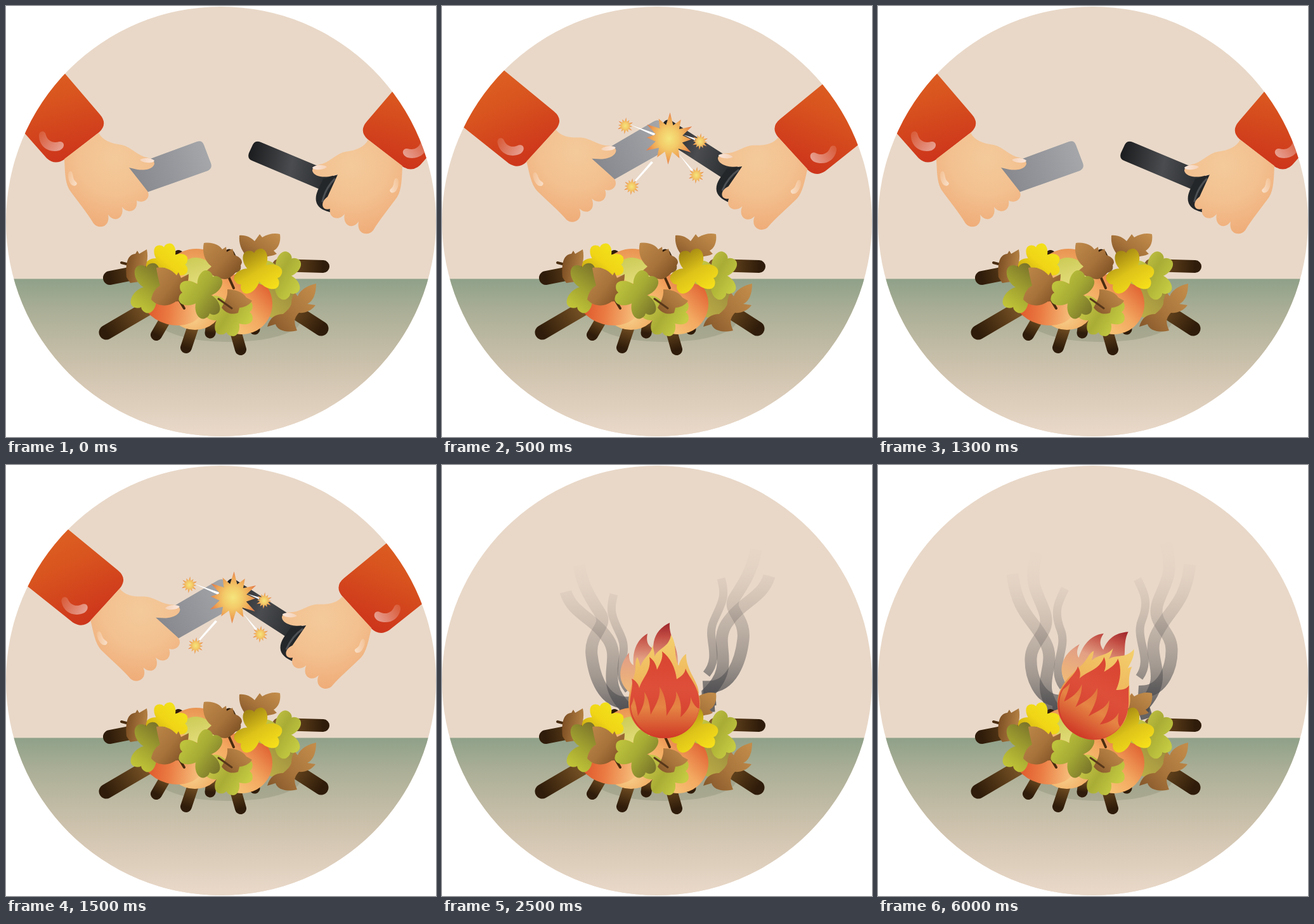
An HTML page that plays this animation: 678 by 680 pixels, repeating every 8000 ms.

```html
<!DOCTYPE html>
<html lang="en">
<head>
<meta charset="utf-8">
<title>Campfire</title>
<style>
  html, body { margin: 0; width: 100%; height: 100%; overflow: hidden; background: #fff; }
  svg { display: block; width: 100%; height: 100%; }
</style>
</head>
<body>
<svg id="stage" viewBox="0 0 678 680" xmlns="http://www.w3.org/2000/svg"></svg>
<script>
const defs = [];

// Linear gradient from (x1,y1) to (x2,y2); stops are [offset, colour, opacity].
function linear(id, [x1, y1, x2, y2], stops, fixed) {
  defs.push(`<linearGradient id="${id}" x1="${x1}" y1="${y1}" x2="${x2}" y2="${y2}"` +
    `${fixed ? ' gradientUnits="userSpaceOnUse"' : ''}>${stopList(stops)}</linearGradient>`);
}
function radial(id, [cx, cy, r], stops, fixed) {
  defs.push(`<radialGradient id="${id}" cx="${cx}" cy="${cy}" r="${r}"` +
    `${fixed ? ' gradientUnits="userSpaceOnUse"' : ''}>${stopList(stops)}</radialGradient>`);
}
function stopList(stops) {
  return stops.map(([o, c, a = 1]) => `<stop offset="${o}" stop-color="${c}" stop-opacity="${a}"/>`).join('');
}
const shape = (d, id, extra = '') => `<path d="${d}" fill="url(#${id})" ${extra}/>`;
const line = (d, color, width) =>
  `<path d="${d}" fill="none" stroke="${color}" stroke-width="${width}" stroke-linecap="round"/>`;
const blob = (cx, cy, rx, ry, id, turn = 0) =>
  `<ellipse cx="${cx}" cy="${cy}" rx="${rx}" ry="${ry}" fill="url(#${id})" transform="rotate(${turn} ${cx} ${cy})"/>`;

linear('ground', [0, 430, 0, 672], [[0, '#8fa189'], [.22, '#acaf97'], [.6, '#cfc3ae'], [1, '#e9d8c8']], true);
linear('sleeve', [.45, .2, .6, 1], [[0, '#e16a25'], [.5, '#d9551f'], [1, '#cd351b']]);
radial('skin', [172, 240, 112], [[0, '#f4ca9b'], [.5, '#f3c190'], [1, '#efac78']], true);
linear('shine', [0, 0, 1, .7], [[0, '#fff', .1], [1, '#fff', .5]]);
linear('nail', [0, 0, 1, 0], [[0, '#f4d2b8'], [1, '#fae6db']]);
linear('steel', [0, .6, 1, .4], [[0, '#85878c'], [.5, '#94969b'], [1, '#a5a7aa']]);
linear('iron', [0, .5, 1, .4], [[0, '#25282a'], [.5, '#4a4c4f'], [1, '#1c1d1f']]);
radial('spark', [.5, .5, .5], [[0, '#f5e57c'], [.4, '#f3cb69'], [.75, '#efa656'], [1, '#e5804b']]);
radial('peach', [.45, .7, .75], [[0, '#f8d28e'], [.6, '#f1ae65'], [1, '#e88f4e']]);
linear('ember', [0, .5, 1, .4], [[0, '#dc4d25'], [.45, '#ea7a42'], [1, '#f8c984']]);
linear('amber', [.1, .9, .9, .1], [[0, '#f9ce7d'], [.5, '#f3a860'], [1, '#de5a2d']]);
linear('lime', [0, 0, 1, 1], [[0, '#c7c850'], [1, '#ebe184']]);
linear('straw', [0, 1, 1, 0], [[0, '#c4b74a'], [1, '#95853b']]);
linear('yellow', [20, -30, -28, 26], [[0, '#f3e11a'], [.45, '#f0d516'], [1, '#c3a213']], true);
linear('gold', [20, 30, -20, -34], [[0, '#f7e01a'], [.5, '#ddc319'], [1, '#9f8313']], true);
linear('olive', [-22, 34, 22, -26], [[0, '#c3c738'], [.5, '#a1a230'], [1, '#7d762b']], true);
linear('green', [-30, -18, 30, 22], [[0, '#bdc33c'], [.45, '#a5aa34'], [1, '#79752a']], true);
linear('fresh', [30, 20, -32, -18], [[0, '#c6cc42'], [.5, '#a9ac35'], [1, '#cacb4a']], true);
linear('brown', [0, .9, 1, .1], [[0, '#85572a'], [.45, '#a8743b'], [1, '#c28c4a']]);
linear('bark', [0, .1, 1, .9], [[0, '#bd8748'], [.5, '#a8733b'], [1, '#774b20']]);
linear('umber', [0, .4, 1, .6], [[0, '#7b4d22'], [1, '#b98546']]);
linear('smoke', [0, 395, 0, 150], [[0, '#46464b', .8], [.25, '#5a5858', .5],
  [.5, '#736c68', .33], [.68, '#877c75', .19], [.85, '#9d9087', .07], [1, '#b4a59a', .02]], true);
linear('backFire', [0, 250, 0, 352], [[0, '#9f272c'], [.2, '#c24c43'], [.55, '#e3a084'], [1, '#eeb779']], true);
linear('outerFire', [0, 268, 0, 431], [[0, '#f4d06d'], [.45, '#efb75c'], [1, '#d8572d']], true);
linear('midFire', [0, 290, 0, 431], [[0, '#d8432f'], [.45, '#de4f3a'], [1, '#d03a28']], true);
linear('innerFire', [0, 350, 0, 431], [[0, '#e0733c'], [.4, '#e58544'], [1, '#cf3826']], true);

// Hands are drawn for the left side; the right one is mirrored.
function hand(tool, knuckle) {
  return shape('M0,-2 L148,171 Q161,186 147,199 L92,242 Q77,252 64,240 L-40,122Z', 'sleeve') +
    shape('M52,206C51,196 62,195 63,204C66,213 74,217 84,214C93,213 94,224 84,228C67,232 53,222 52,206Z', 'shine') +
    tool +
    shape('M91,242L146,200C152,212 166,217 182,219C196,222 204,233 218,238C228,240 234,243 234,249' +
      `C232,257 220,260 207,258L194,255${knuckle}C209,323 193,330 183,317C187,335 171,343 161,329` +
      'C165,349 146,353 138,343C128,326 112,307 100,290C93,278 93,262 92,241Z', 'skin') +
    shape('M211,243C217,238 230,240 234,244C233,248 218,249 211,243Z', 'nail') +
    shape('M99,262C104,258 105,264 106,270C107,276 111,277 112,280C111,285 104,285 101,279C98,273 97,266 99,262Z', 'shine');
}
const leftHand = hand(
  shape('M190,255L301,214Q309,211 312,219L323,248Q326,256 318,260L205,300Z', 'steel'),
  'L223,292C229,302 218,313 206,307');
const rightHand = hand(
  shape('M205,250L315,204Q324,200 328,208L334,221Q337,230 329,233L218,280L198,262Z', 'iron') +
  '<path d="M194,255L217,262C224,277 230,286 228,297C226,307 217,312 203,315L198,290Z" fill="#242729"/>' +
  line('M199,262Q213,276 218,297', '#4d5053', 3),
  'L210,290C222,298 220,313 206,309');

function star(cx, cy, r, turn) {
  const pts = [];
  for (let i = 0; i < 24; i++) {
    const a = i * Math.PI / 12 + turn;
    const d = r * (i % 2 ? .53 : i % 4 ? .86 : 1);
    pts.push((cx + d * Math.sin(a)).toFixed(1) + ',' + (cy - d * Math.cos(a)).toFixed(1));
  }
  return `<polygon points="${pts.join(' ')}" fill="url(#spark)"/>`;
}
const sparks = '<path d="M296,187L336,201L335,205ZM330,245L333,247L306,277L304,275ZM373,233L396,259L393,260ZM380,203L400,209L399,212Z" fill="#fff"/>' +
  star(358, 209, 41, .04) +
  [[289, 189], [407, 214], [401, 267], [299, 285]].map(([x, y]) => star(x, y, 13, .1)).join('');

// Logs fade from a dark tip to a lighter brown.
const logs = [
  [164, 429, 235, 415, 22], [158, 515, 228, 474, 23], [500, 411, 430, 409, 20],
  [497, 509, 435, 469, 23], [237, 519, 255, 488, 18], [322, 516, 325, 494, 17],
  [392, 510, 386, 490, 17], [284, 539, 297, 500, 18], [370, 542, 357, 496, 18],
  [352, 392, 362, 412, 17], [272, 393, 268, 410, 16]
].map(([x1, y1, x2, y2, w], i) => {
  linear('log' + i, [x1, y1, x2, y2], [[0, '#2f1c0a'], [.5, '#573a18'], [1, '#80592a']], true);
  return line(`M${x1},${y1}L${x2},${y2}`, `url(#log${i})`, w);
}).join('');

function clover(x, y, turn, spread, size, id) {
  const lobe = 'M0,3C-24,-6 -25,-38 -10,-38Q-3,-38 0,-33Q3,-38 10,-38C25,-38 24,-6 0,3Z';
  return `<g transform="translate(${x} ${y}) scale(${size})">` +
    [0, -spread, spread].map(a => {
      const key = id + Math.round(x) + (a + 200);
      // Each lobe keeps the shading of the whole leaf.
      defs.push(`<linearGradient id="${key}" href="#${id}" gradientTransform="rotate(${-turn - a})"/>`);
      return shape(lobe, key, `transform="rotate(${turn + a})"`);
    }).join('') + '</g>';
}

const pile = '<ellipse cx="352" cy="497" rx="112" ry="33" fill="#777d66" opacity=".28"/>' + logs +
  blob(425, 463, 32, 29, 'straw') +
  blob(300, 440, 56, 57, 'peach') + blob(298, 474, 42, 37, 'peach') + blob(263, 466, 50, 37, 'ember', 15) +
  blob(372, 470, 48, 48, 'amber') + blob(304, 418, 27, 20, 'lime', 20) +
  clover(254, 408, -10, 100, .85, 'yellow') +
  line('M182,405L194,408', '#4a2d10', 4) +
  shape('M190,428C188,405 192,392 204,391L207,386L210,391L222,384C225,398 222,412 214,418L216,424L206,428L210,435L196,437Z', 'umber') +
  clover(227, 445, 205, 145, 1, 'olive') +
  line('M272,462L281,477', '#4a2d10', 4) +
  shape('M229,463C231,452 236,445 243,441C240,430 238,420 237,413C250,411 262,416 269,425L272,420L276,429L288,423' +
    'C288,438 283,447 279,452C283,458 274,468 268,466C258,474 240,476 229,463Z', 'bark') +
  shape('M368,362C378,361 386,365 392,371L400,360L404,365C414,359 424,358 432,360C434,374 428,383 422,386' +
    'L427,391C420,395 414,394 410,396L380,396C370,384 367,374 368,362Z', 'brown') +
  line('M350,425L359,445', '#4a2d10', 4) +
  shape('M312,374C327,372 337,378 341,384L347,380L348,388L357,383L360,393C366,395 372,398 372,405' +
    'C368,415 360,425 350,430C340,434 322,424 316,418L324,411C312,402 309,386 312,374Z', 'bark') +
  clover(432, 425, 35, 115, .98, 'fresh') +
  clover(397, 421, -10, 115, .97, 'gold') +
  clover(352, 483, 188, 98, .97, 'fresh') +
  clover(310, 455, -85, 115, .97, 'green') +
  shape('M349,447C365,447 376,454 379,460L388,465C384,472 374,476 368,476L366,484C355,488 346,484 340,476C344,468 350,460 349,447Z', 'brown') +
  line('M335,462L356,477', '#57371a', 3) +
  shape('M489,438C489,455 484,466 475,470L488,472C482,481 470,485 462,484C452,494 455,502 459,512C442,516 428,512 425,502' +
    'L412,506C416,492 424,486 437,486C443,481 448,476 450,470C450,462 452,456 456,453L460,458C464,447 476,441 489,438Z', 'brown');

const backFire = shape('M300,362C278,348 274,322 295,296C294,308 298,314 302,316C300,296 306,276 324,266' +
  'C321,280 326,286 333,290C333,272 340,258 359,249C357,270 372,285 372,310L372,360Z', 'backFire') +
  shape('M385,298C376,304 370,318 372,336L380,380L405,360C404,340 384,324 385,298Z', 'outerFire');
const frontFire = shape('M351,431C318,431 294,406 294,376C294,350 305,338 305,318C305,310 306,306 308,303C312,312 312,316 313,318' +
    'C318,302 330,300 332,284C334,292 335,296 335,302C342,288 358,288 361,268C372,284 364,302 374,318' +
    'C382,334 406,347 407,374C407,406 384,431 351,431Z', 'outerFire') +
  shape('M351,431C320,431 296,408 296,378C297,360 302,346 299,337C307,341 310,347 311,352C316,335 331,325 327,303' +
    'C335,309 338,316 339,323C344,313 349,305 347,294C360,304 368,320 370,338C376,334 383,330 384,321' +
    'C390,337 406,350 406,376C406,408 382,431 351,431Z', 'midFire') +
  shape('M351,430C322,430 298,405 298,380C300,375 302,371 302,366C306,376 307,386 309,396C316,384 321,373 319,358' +
    'C326,368 328,382 329,394C336,380 345,368 343,350C352,362 354,380 354,396C362,382 371,372 369,357' +
    'C377,370 378,384 376,398C386,389 393,379 392,366C396,378 402,384 405,384C402,410 380,430 351,430Z', 'innerFire');

// Each set: shift of the mirrored right side, then three ribbons of the left side.
const smoke = [
  [710, -28, 'M288,405L288,372C250,365 238,335 236,300S262,265 248,235S198,200 198,162',
    'M290,415L290,385C245,340 285,310 262,275S205,262 180,210', 'M296,355C270,325 295,300 278,268S257,235 258,210'],
  [711, -25, 'M288,405L290,375C255,375 240,335 236,300S262,255 250,235S222,195 216,158',
    'M290,415L292,385C245,340 285,310 262,275S205,235 195,200', 'M294,355C270,325 295,300 283,272S262,235 271,204'],
  [704, -15, 'M286,405L284,372C255,370 240,335 241,305S275,265 262,230S238,190 250,138',
    'M280,415L286,395C240,345 285,320 264,280S220,235 212,172', 'M292,350C270,320 300,290 288,260S285,215 295,195']
].map(([x, y, ...ribbons], i) => {
  const side = ribbons.map((d, k) =>
    `<path d="${d}" fill="none" stroke="url(#smoke)" stroke-width="${k === 2 ? 13 : 19}"/>`).join('');
  return `<g id="smoke${i}">${side}<g transform="translate(${x} ${y}) scale(-1 1)">${side}</g></g>`;
}).join('');

const stage = document.getElementById('stage');
const scene = '<circle cx="339" cy="340" r="339" fill="#e9d8c8"/>' +
  '<g clip-path="url(#round)"><rect y="430.5" width="678" height="250" fill="url(#ground)"/>' +
  smoke + pile + `<g id="fire"><g id="back">${backFire}</g><g id="front">${frontFire}</g></g>` +
  `<g id="hands"><g id="left">${leftHand}</g><g id="right"><g transform="translate(717 11) scale(-1 1)">${rightHand}</g></g></g>` +
  `<g id="sparks">${sparks}</g></g>`;
stage.innerHTML = `<defs><clipPath id="round"><circle cx="339" cy="340" r="339"/></clipPath>${defs.join('')}</defs>${scene}`;

const el = id => document.getElementById(id);
const apart = { left: '', right: '' };
const strike = {
  left: 'translate(274 225) rotate(-10) translate(-234 -246)',
  right: 'translate(434 240) rotate(10) translate(-482 -260)',
  sparks: true
};
// fire: shift x, shift y, turn of the back tongues, turn of the front.
const poses = [
  apart, strike, apart, strike,
  { left: 'translate(-58 -33)', right: 'translate(36 -33)', smoke: 0, fire: [-6, 3, 14.5, 20] },
  { smoke: 1, fire: [0, 0, 0, 0] },
  { smoke: 2, fire: [-11, 2, 22, 31] }
];
const STEP = 500, LOOP = 8000;
const show = (id, on) => el(id).setAttribute('visibility', on ? 'visible' : 'hidden');
const move = (id, t) => el(id).setAttribute('transform', t);

function pose(p) {
  const hands = p.left !== undefined;
  show('hands', hands);
  if (hands) { move('left', p.left); move('right', p.right); }
  show('sparks', !!p.sparks);
  for (let i = 0; i < 3; i++) show('smoke' + i, p.smoke === i);
  show('fire', !!p.fire);
  if (p.fire) {
    const [x, y, back, front] = p.fire;
    move('fire', `translate(${x} ${y})`);
    move('back', `rotate(${back} 351 375)`);
    move('front', `rotate(${front} 351 375)`);
  }
}

let current = -1;
const start = performance.now();
function tick() {
  const t = (performance.now() - start) % LOOP;
  const i = Math.min(poses.length - 1, Math.floor(t / STEP));
  if (i !== current) pose(poses[current = i]);
  requestAnimationFrame(tick);
}
tick();
</script>
</body>
</html>
```
